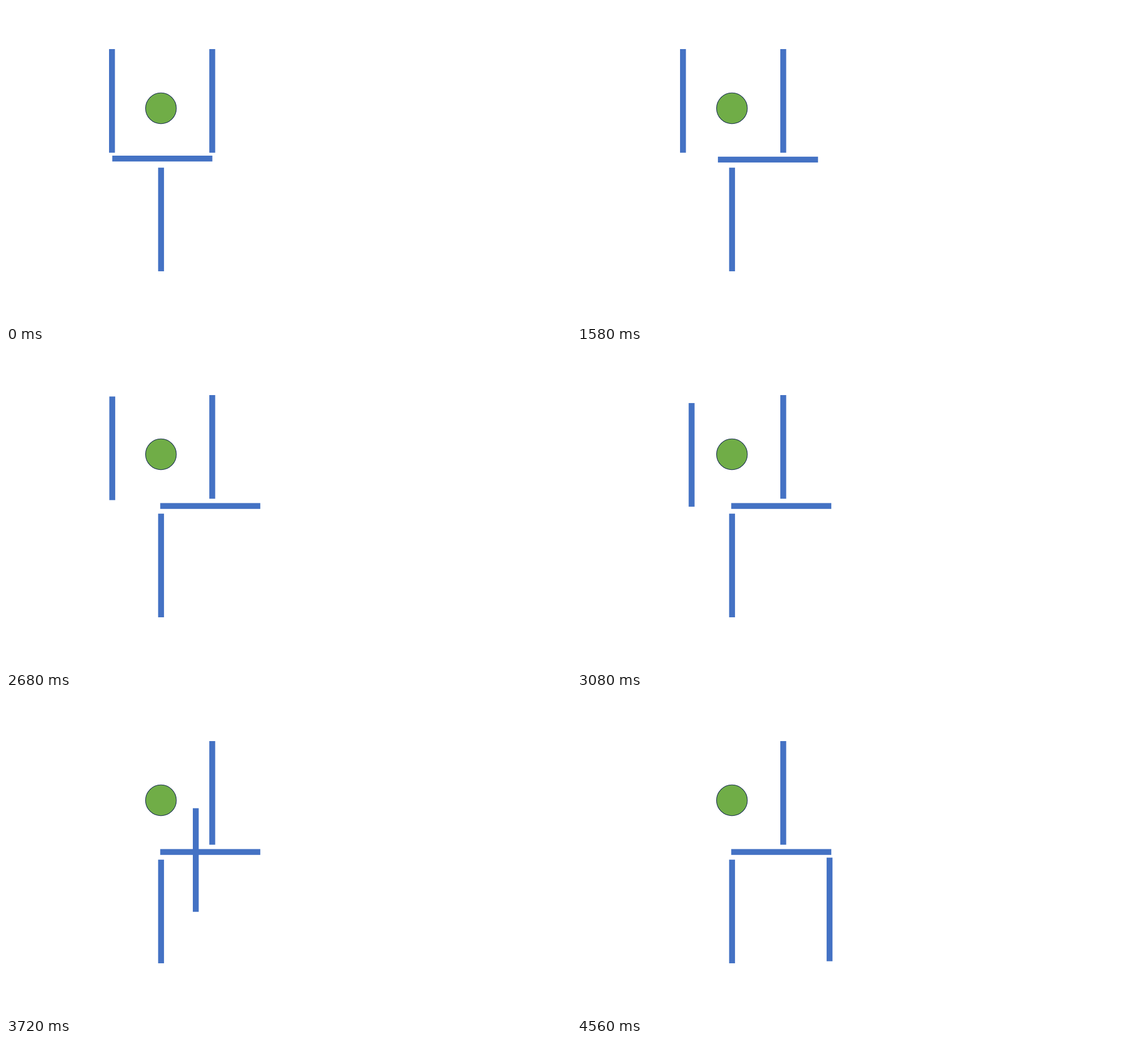
An HTML page that plays this animation: 998 by 561 pixels, repeating every 4.93 s.

```html
<!DOCTYPE html>
<html lang="en">
<head>
<meta charset="utf-8">
<style>
  html, body { margin: 0; width: 100%; height: 100%; overflow: hidden; background: #fff; }
  svg { display: block; }
</style>
</head>
<body>
<svg width="998" height="561" viewBox="0 0 998 561">
  <g fill="#4472c4">
    <rect x="359.1" y="76" width="10.4" height="182.8"/>
    <rect x="268.7" y="285.2" width="10.4" height="182.8"/>
    <rect id="beam" width="176.8" height="10.3"/>
    <rect id="post" width="10.4" height="182.8"/>
  </g>
  <circle cx="273.7" cy="180.5" r="27.2" fill="#70ad47" stroke="#172c51" stroke-width="1.1"/>
</svg>
<script>
const LOOP = 4930, STEP = 40, TRAVEL = 1740;

// Each bar waits at rest, appears at its path start, then glides to the end.
const moves = [
  { bar: document.getElementById('beam'), rest: [187.7, 264], from: [187.7, 264], to: [272.4, 266.5], first: 540, start: 488 },
  { bar: document.getElementById('post'), rest: [182, 76], from: [182.5, 78.5], to: [440.9, 281.6], first: 2680, start: 2786 }
];

// Constant acceleration for one half, constant braking for the other.
const ease = u => u < 0.5 ? 2 * u * u : 1 - 2 * (1 - u) ** 2;

function position({ rest, from, to, first, start }, time) {
  if (time < first) return rest;
  const tick = first + Math.floor((time - first) / STEP) * STEP;
  const p = ease(Math.min(1, Math.max(0, (tick - start) / TRAVEL)));
  return from.map((v, i) => v + (to[i] - v) * p);
}

function draw(time) {
  for (const move of moves) {
    const [x, y] = position(move, time);
    move.bar.setAttribute('x', x);
    move.bar.setAttribute('y', y);
  }
}

const origin = performance.now();
function frame() {
  draw((performance.now() - origin) % LOOP);
  requestAnimationFrame(frame);
}
frame();
</script>
</body>
</html>
```
